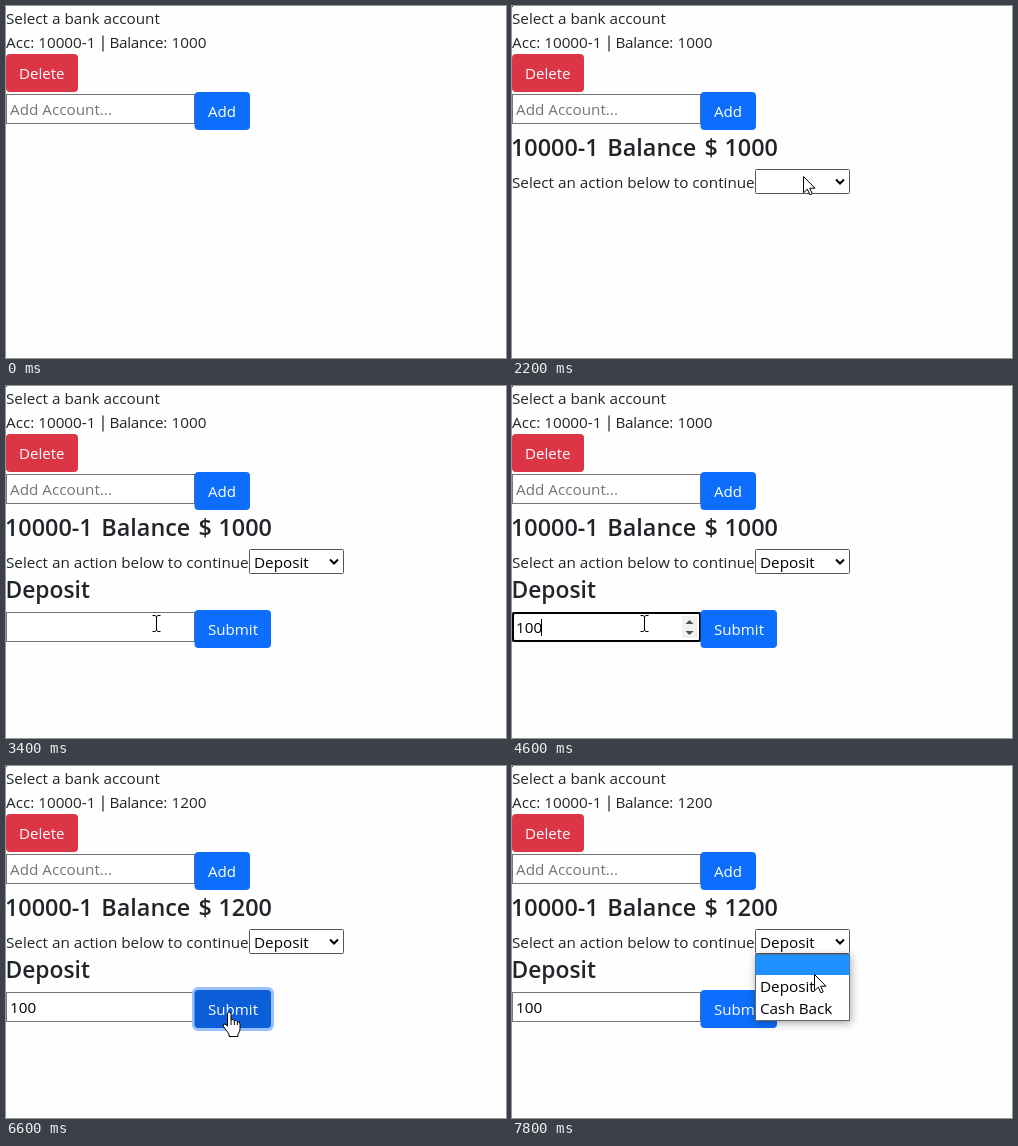
An HTML page for the animation above (8 s loop, 500 by 352 pixels).

```html
<!DOCTYPE html>
<html lang="en">
<head>
<meta charset="utf-8">
<title>Bank account demo</title>
<style>
  html, body { margin: 0; width: 100%; height: 100%; overflow: hidden; background: #fefefe; }
  svg { display: block; width: 100%; height: 100%; }
  text { font: 15.26px "Open Sans", "Noto Sans", sans-serif; fill: #212529; white-space: pre; }
  .title { font-size: 23.4px; font-weight: 600; }
  .light { fill: #fff; font-size: 15.1px; font-weight: 500; }
  .hint { fill: #757575; }
  .dark { fill: #000; }
  .field { fill: #fff; stroke: #767676; }
  .list { fill: #fff; stroke: #666; filter: drop-shadow(1px 2px 4px rgba(0, 0, 0, .35)); }
  .cursor { fill: #fff; stroke: #000; stroke-linejoin: round; }
</style>
</head>
<body>
<svg viewBox="0 0 500 352">
  <rect width="500" height="352" fill="#fefefe"/>
  <text x="0" y="18">Select a bank account</text>
  <text x="0" y="42">Acc: 10000-1</text>
  <path d="M97 29.5V45.5" stroke="#212529" stroke-width="1.2"/>
  <text x="103.5" y="42" letter-spacing="-.3">Balance:</text>
  <text id="balance" x="165.5" y="42"></text>

  <rect y="48" width="72" height="38" rx="4" fill="#dc3545"/>
  <text class="light" x="13" y="73">Delete</text>
  <rect class="field" x=".5" y="88.5" width="188" height="29"/>
  <text class="hint" x="4" y="109">Add Account...</text>
  <rect x="188.5" y="86" width="55.5" height="38" rx="4" fill="#0d6efd"/>
  <text class="light" x="202" y="111">Add</text>

  <g id="account">
    <rect width="1" height="1" fill="#333"/>
    <text class="title" x="-1" y="150">10000-1</text>
    <text class="title" x="95.3" y="150">Balance</text>
    <text class="title" x="192.5" y="150">$</text>
    <text class="title" id="total" x="212.5" y="150"></text>
    <text x="0" y="182">Select an action below to continue</text>
    <rect x="243.5" y="163.5" width="94" height="24" rx="1" fill="#fff" stroke="#555"/>
    <path d="M324 173.5l4 4 4-4" fill="none" stroke="#000" stroke-width="2"/>
  </g>

  <g id="form">
    <text class="dark" x="248" y="182">Deposit</text>
    <text class="title" x="-.5" y="212" style="font-size:22.8px">Deposit</text>
    <rect class="field" x=".5" y="226.5" width="188" height="29"/>
    <g id="focus">
      <rect x="1" y="227" width="187" height="28" rx="2" fill="#fff" stroke="#000" stroke-width="2"/>
      <rect x="170" y="230" width="15" height="22" fill="#f0f0f0"/>
      <path d="M173.5 238l4-4 4 4zM173.5 245l4 4 4-4z" fill="#505050"/>
      <path id="caret" d="M.5 233V250" stroke="#000"/>
    </g>
    <text id="amount" class="dark" x="4" y="247"></text>
    <rect id="ring" x="186" y="221" width="82" height="44" rx="6" fill="#98c1fe"/>
    <rect id="submit" x="188.5" y="224" width="76.5" height="38" rx="4"/>
    <text class="light" x="202" y="249">Submit</text>
  </g>

  <g id="menu">
    <rect class="list" x="243.5" y="188.5" width="94" height="66"/>
    <rect id="mark" x="243.5" width="94" fill="#1e90ff"/>
    <text id="option" x="248" y="226">Deposit</text>
    <text class="dark" x="248" y="248">Cash Back</text>
  </g>

  <g id="arrow" class="cursor"><path d="M.5 .5V16.8L4.3 13.2 6.9 18.8 9.2 17.8 6.7 12.2H12Z"/></g>
  <g id="beam"><path d="M-3.5-7.5H-1L.5-6.5 2-7.5H4.5M.5-6.5V7.5M-3.5 8.5H-1L.5 7.5 2 8.5H4.5" fill="none" stroke="#000"/></g>
  <g id="hand" class="cursor">
    <path d="M-1.5 14V2Q-1.5 0 .2 0T2 2V8Q4.5 6.5 5.3 8.8 7.5 7.5 8.3 9.8 11 9 11 12V17Q11 20 9 22V24.5H0V22L-5.5 14.5Q-6.5 12-4 12Z"/>
    <path d="M2 8v5M5.3 9v4M8.3 10v3" fill="none"/>
  </g>
</svg>
<script>
const LOOP = 8000;
const part = id => document.getElementById(id);
const show = (id, on) => { part(id).style.display = on ? "" : "none"; };

// Each step: time, cursor shape, x, y, and whatever else changes then.
const steps = [
  [0, "", 0, 0, { balance: "1000", amount: "" }],
  [200, "arrow", 238, 124],
  [400, "arrow", 206, 104],
  [600, "arrow", 170, 80],
  [800, "arrow", 142, 58],
  [1000, "beam", 122, 42],
  [1200, "beam", 114, 38],
  [1400, "beam", 114, 38, { account: true }],
  [1600, "arrow", 158, 84],
  [1800, "arrow", 220, 134],
  [2000, "arrow", 274, 164],
  [2200, "arrow", 291, 170],
  [2400, "arrow", 291, 170, { menu: "blank" }],
  [2600, "arrow", 292, 198],
  [2800, "arrow", 292.5, 221.5, { menu: "deposit" }],
  [3000, "arrow", 293, 222, { menu: "", form: true }],
  [3200, "hand", 232, 232],
  [3400, "beam", 150, 237],
  [3600, "beam", 132, 237, { focus: true }],
  [4200, "beam", 132, 237, { amount: "1" }],
  [4400, "beam", 132, 237, { amount: "10" }],
  [4600, "beam", 132, 237, { amount: "100" }],
  [5200, "beam", 172, 242],
  [5400, "hand", 216, 246],
  [5600, "hand", 223, 246, { balance: "1100", focus: false, pressed: true }],
  [6600, "hand", 223, 246, { balance: "1200" }],
  [6800, "hand", 238, 234],
  [7000, "arrow", 268, 212],
  [7200, "arrow", 288, 192],
  [7400, "arrow", 294, 186],
  [7600, "arrow", 296, 188, { menu: "deposit", pressed: false }],
  [7800, "arrow", 302, 208, { menu: "blank" }]
];

let state = {};
const timeline = steps.map(([time, cursor, x, y, change]) =>
  (state = { ...state, time, cursor, x, y, ...change }));

function draw(s) {
  for (const id of ["account", "form", "focus", "menu"]) show(id, s[id]);
  show("ring", s.pressed);
  part("submit").setAttribute("fill", s.pressed ? "#0b5ed7" : "#0d6efd");
  part("balance").textContent = part("total").textContent = s.balance;
  part("total").setAttribute("dx", s.balance === "1100" ? "0 -3.6" : "0");
  part("amount").textContent = s.amount;
  part("caret").setAttribute("transform", `translate(${Math.round(3 + s.amount.length * 8.73)} 0)`);

  const blank = s.menu === "blank";
  part("mark").setAttribute("y", blank ? 188.5 : 208.5);
  part("mark").setAttribute("height", blank ? 20.5 : 22.5);
  part("option").setAttribute("class", blank ? "dark" : "light");

  for (const id of ["arrow", "beam", "hand"]) {
    show(id, s.cursor === id);
    part(id).setAttribute("transform", `translate(${s.x} ${s.y})`);
  }
}

let shown;
function tick() {
  const time = performance.now() % LOOP;
  const current = timeline.findLast(s => s.time <= time);
  if (current !== shown) draw(shown = current);
  requestAnimationFrame(tick);
}
tick();
</script>
</body>
</html>
```
